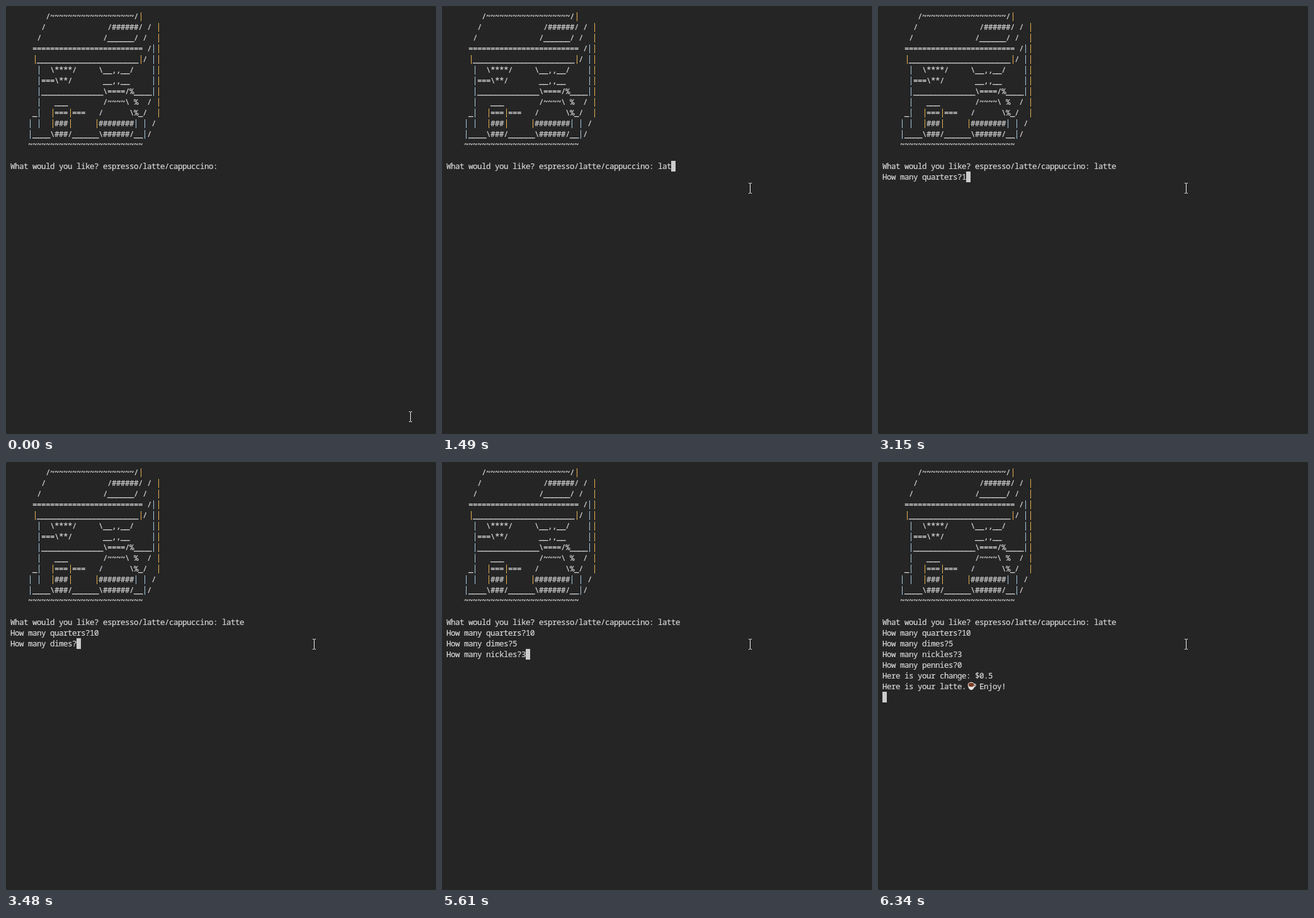
These frames come from a looping animation (683 by 680 pixels, 8 s). An HTML page:

```html
<!DOCTYPE html>
<html lang="en">
<head>
<meta charset="utf-8">
<title>Coffee machine terminal</title>
<style>
  html, body { margin: 0; width: 100%; height: 100%; overflow: hidden; background: #252526; }
  #stage { position: relative; width: 683px; height: 680px; overflow: hidden; background: #252526; }
  pre {
    position: absolute; left: 7px; margin: 0; color: #d8d8d8;
    font: 12.5px/17px "Noto Sans Mono", monospace; letter-spacing: -.5px;
    font-variant-ligatures: none; font-kerning: none;
    -webkit-text-stroke: .2px #d8d8d8;
  }
  #art { top: 8px; }
  #log { top: 246px; }
  .bar {
    display: inline-block; width: 7px; height: 17px; vertical-align: top;
    color: transparent; -webkit-text-stroke: 0;
    background: linear-gradient(#a6c6da, #a6c6da) 3px 2px / 1px 14px no-repeat;
  }
  .bar.odd {
    background: linear-gradient(#e6b04e, #e6b04e) 4px 2px / 1px 14px no-repeat;
  }
  #caret { position: absolute; width: 7px; height: 17px; background: #ccc; }
  #stage svg { position: absolute; left: 0; top: 0; }
</style>
</head>
<body>
<div id="stage">
<pre id="art">
        /~~~~~~~~~~~~~~~~~~~/|
       /              /######/ / |
      /              /______/ /  |
     ========================= /||
     |_______________________|/ ||
      |  \****/     \__,,__/    ||
      |===\**/       __,,__     ||
      |______________\====/%____||
      |   ___        /~~~~\ %  / |
     _|  |===|===   /      \%_/  |
    | |  |###|     |########| | /
    |____\###/______\######/__|/
    ~~~~~~~~~~~~~~~~~~~~~~~~~~
</pre>
<pre id="log"></pre>
<div id="caret"></div>
<svg id="cup" width="16" height="16" viewBox="0 0 18 18" style="left:141px;top:348px">
  <path d="M12 7q4-3 4 0t-4 4" fill="none" stroke="#ddd" stroke-width="1.3"/>
  <path d="M2 6C2 11 4 16 8 16S14 11 14 6Z" fill="#e6e2df"/>
  <ellipse cx="8" cy="6.5" rx="6" ry="4.6" fill="#f0ece8"/>
  <ellipse cx="8" cy="6.7" rx="5" ry="3.7" fill="#7a3b22"/>
</svg>
<svg id="mouse" width="7" height="17">
  <path d="M1 .5H3M4 .5H6M3.5 1V16M1 16.5H3M4 16.5H6" fill="none" stroke="#f4f4f4"/>
</svg>
</div>
<script>
const LOOP = 8000;
const $ = id => document.getElementById(id);

// Text added to the terminal at each time
const output = [
  [0, "What would you like? espresso/latte/cappuccino: "],
  [1220, "l"], [1290, "a"], [1490, "t"], [1620, "t"], [1690, "e"],
  [1820, "\n"], [1890, "How many quarters?"],
  [3150, "1"], [3280, "0"], [3410, "\n"], [3480, "How many dimes?"],
  [4550, "5"], [4680, "\nHow many nickles?"],
  [5610, "3"], [5870, "\nHow many pennies?"],
  [6070, "0"],
  [6340, "\nHere is your change: $0.5\nHere is your latte.   Enjoy!\n"]
];

// Subpixel tint of the bars alternates by column
$("art").innerHTML = $("art").textContent.split("\n").map(line =>
  line.replace(/\|/g, (bar, col) => `<span class="bar${col % 2 ? " odd" : ""}">|</span>`)
).join("\n");

function drawMouse(t) {
  const step = Math.max(0, Math.min(6, Math.floor((t - 70) / 68) + 1));
  const p = step / 6, e = p * p * (3 - 2 * p);
  const x = Math.round(639 - 153 * e), y = Math.round(644 - 363 * e);
  $("mouse").style.transform = `translate(${x}px, ${y}px)`;
}

function drawLog(t) {
  const text = output.filter(([at]) => at <= t).map(([, s]) => s).join("");
  if ($("log").textContent !== text) $("log").textContent = text;
  const lines = text.split("\n");
  const caret = $("caret").style;
  caret.left = 7 + 7 * lines[lines.length - 1].length + "px";
  caret.top = 246 + 17 * (lines.length - 1) + "px";
  caret.visibility = t >= 480 ? "visible" : "hidden";
  $("cup").style.visibility = t >= 6340 ? "visible" : "hidden";
}

const start = performance.now();
function draw() {
  const t = (performance.now() - start) % LOOP;
  drawMouse(t);
  drawLog(t);
  requestAnimationFrame(draw);
}
draw();
</script>
</body>
</html>
```
